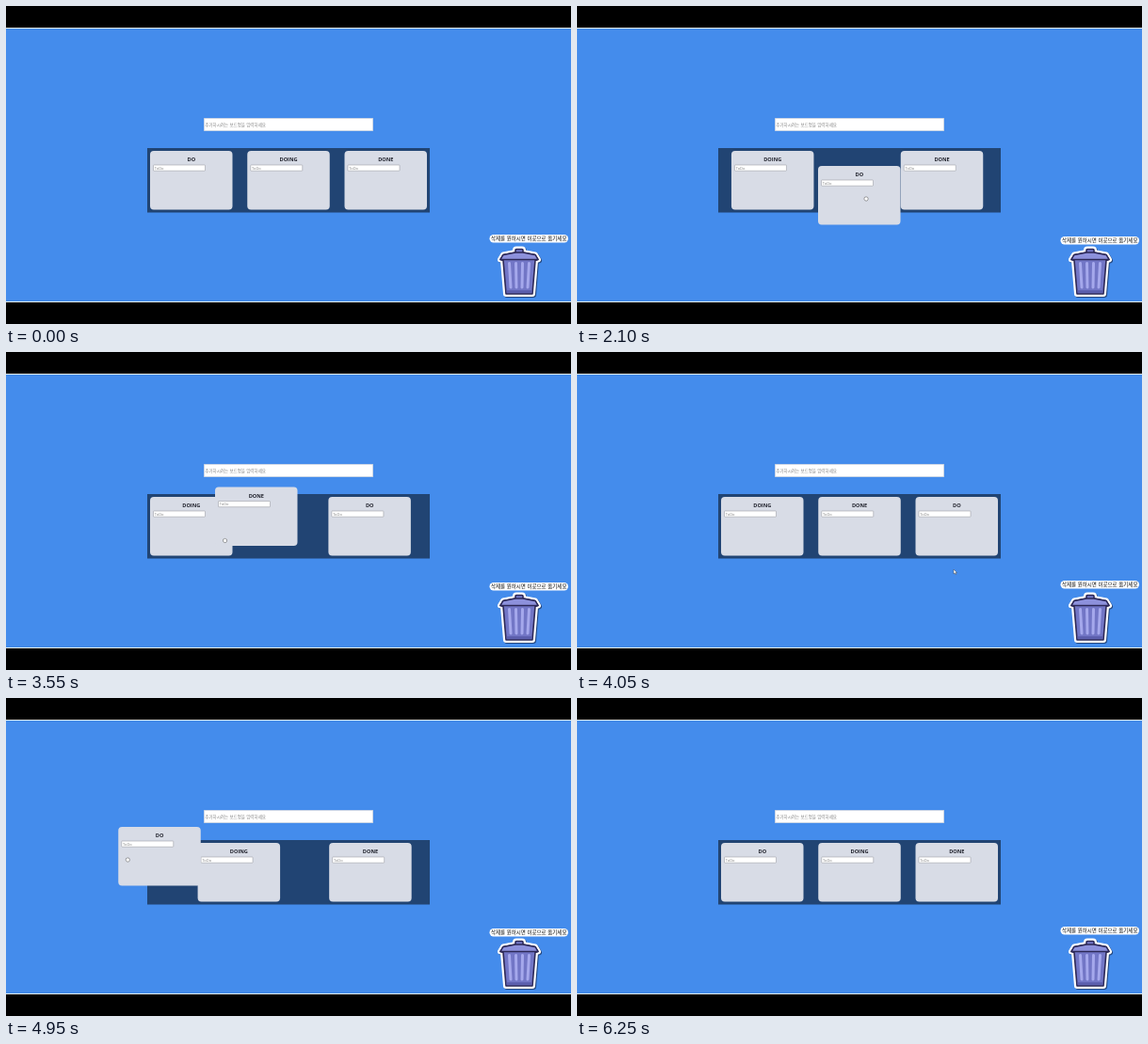
An HTML page for the animation above (6550 ms loop, 600 by 338 pixels).

```html
<!DOCTYPE html>
<html lang="ko">
<head>
<meta charset="utf-8">
<style>
  html, body { margin: 0; width: 100%; height: 100%; overflow: hidden; background: #000; }
  svg { display: block; width: 100vw; height: 100vh; }
  text { font-family: "Noto Sans CJK KR", "Noto Sans", sans-serif; }
  .title { font: bold 5.6px "Open Sans", "Noto Sans", sans-serif; fill: #20222c; text-anchor: middle; }
  .hint { font: 4px "Open Sans", "Noto Sans", sans-serif; fill: #858585; }
</style>
</head>
<body>
<svg viewBox="0 0 600 338">
  <defs>
    <path id="can" d="M541 262V259.500Q541 258.500 542 258.500H548Q549 258.500 549 259.500V262L562 264.500L565 269.500L562 270.500L559 306H531L528 270.500L525 269.500L528 264.500Z" stroke-linejoin="round"/>
  </defs>
  <rect width="600" height="338" fill="#000"/>
  <rect y="23" width="600" height="292" fill="#e6effa"/>
  <rect y="24" width="600" height="290" fill="#448cec"/>

  <rect x="210.250" y="119.250" width="179.500" height="13.500" fill="#fff" stroke="#c5cad3" stroke-width=".5"/>
  <text x="211.300" y="127.600" font-size="4.500" fill="#858585">추가하시려는 보드명을 입력하세요</text>
  <rect x="150" y="151" width="300" height="68.500" fill="#214473"/>

  <use href="#can" x="1" y="1" fill="#24477f" stroke="#24477f" stroke-width="6"/>
  <use href="#can" fill="#fff" stroke="#fff" stroke-width="6"/>
  <use href="#can" fill="#7276c6" stroke="#2c2857" stroke-width="1.600"/>
  <path d="M528 264.500L541 262H549L562 264.500L565 269.500H525Z" fill="#8d91dc" stroke="#2c2857" stroke-width="1.400" stroke-linejoin="round"/>
  <path d="M534.500 273.500L536 299M541.500 273.500L542 299M548.500 273.500L548 299M555.500 273.500L554 299" stroke="#a5a8ec" stroke-width="3" stroke-linecap="round"/>
  <path d="M531.500 303.500H558.500" stroke="#5a5dab" stroke-width="2.500"/>

  <g id="label">
    <rect x="513.500" y="243" width="83.500" height="8.500" rx="4.200" fill="#fff"/>
    <text x="555.200" y="249.200" font-size="5.500" font-weight="500" text-anchor="middle" fill="#111">삭제를 원하시면 이곳으로 옮기세요</text>
  </g>

  <g id="cards"></g>
  <path id="arrow" d="M0 0V4.800L1.200 3.800L2 5.500L2.800 5.100L2.100 3.500H3.500Z" fill="#fff" stroke="#333" stroke-width=".4"/>
  <g id="hand">
    <path d="M-1.900 -.6Q-1.900 -2 -.9 -1.800Q0 -2.500 .8 -1.900Q2 -1.900 2 -.6V.6Q1.700 2.100 .2 2.100Q-1.500 2.100 -1.900 .6Z" fill="#fff" stroke="#444" stroke-width=".5"/>
  </g>
</svg>
<script>
const LOOP = 6550, STEP = 50, DROP_MS = 400, SHIFT_MS = 200;
const LEFT = 153, TOP = 154, WIDTH = 87.5, PITCH = 103.25;
const $ = id => document.getElementById(id);

// Cursor path: time, x, y
const path = [
  [750, 330, 126], [1350, 204, 189], [1500, 204, 189], [1900, 240, 196], [2100, 307, 205],
  [2250, 300, 188], [2950, 370, 211], [3050, 370, 211], [3500, 235, 211], [3600, 230, 190],
  [4050, 401, 233], [4300, 369.5, 189], [4350, 369.5, 189], [4700, 253, 255], [4850, 150, 215],
  [5000, 122, 157], [5050, 122, 157], [5300, 185, 197], [5550, 215, 228]
];
const handTimes = [[1300, 2250], [2700, 3600], [4250, 5050]];

// Each drag lists the times at which the card takes an index
const drags = [
  { name: 'DO', drop: 2250, stops: [[1500, 0], [2000, 1]] },
  { name: 'DONE', drop: 3600, stops: [[3050, 2], [3400, 1]] },
  { name: 'DO', drop: 5050, stops: [[4350, 2], [4800, 1], [4900, 0]] }
];

const cards = {};
for (const name of ['DO', 'DOING', 'DONE']) {
  const g = document.createElementNS('http://www.w3.org/2000/svg', 'g');
  g.innerHTML = `<rect width="87.5" height="62.500" rx="4" fill="#d8dce6"/>
    <text class="title" x="43.800" y="11.200">${name}</text>
    <rect x="3.500" y="15" width="55" height="6.200" rx=".6" fill="#fff" stroke="#8c8f96" stroke-width=".5"/>
    <text class="hint" x="4.800" y="19.500">ToDo</text>`;
  $('cards').append(g);
  cards[name] = g;
}

const clamp = v => Math.max(0, Math.min(1, v));
const easeOut = p => 1 - (1 - clamp(p)) ** 3;
const mix = (a, b, p) => a + (b - a) * p;
const move = (el, x, y) => el.setAttribute('transform', `translate(${x} ${y})`);
const show = (el, on) => el.setAttribute('visibility', on ? 'visible' : 'hidden');

function cursorAt(t) {
  const i = path.findIndex(p => p[0] >= t);
  if (i < 1) return path[i ? path.length - 1 : 0].slice(1);
  const [a, b] = [path[i - 1], path[i]];
  const p = (t - a[0]) / (b[0] - a[0]), s = p * p * (3 - 2 * p);
  return [mix(a[1], b[1], s), mix(a[2], b[2], s)];
}

// Siblings at or after the hovered index make room for the card
function shiftOf(j, stops, t) {
  let x = 0;
  stops.forEach(([start, index], k) => {
    if (t >= start) x = mix(x, j >= index ? WIDTH : 0, k ? easeOut((t - start) / SHIFT_MS) : 1);
  });
  return x;
}

function draggedAt({ stops, drop }, t) {
  const [lift, from] = stops[0], to = stops[stops.length - 1][1];
  const grab = cursorAt(lift), now = cursorAt(Math.min(t, drop));
  const p = easeOut((t - drop) / DROP_MS);
  return [
    mix(LEFT + from * PITCH + now[0] - grab[0], LEFT + to * WIDTH, p),
    mix(TOP + now[1] - grab[1], TOP, p)
  ];
}

function draw(t) {
  let order = ['DO', 'DOING', 'DONE'], active;
  for (const d of drags) {
    if (t < d.stops[0][0]) break;
    const rest = order.filter(n => n !== d.name);
    if (t < d.drop + DROP_MS) {
      active = d;
      order = rest;
    } else {
      rest.splice(d.stops[d.stops.length - 1][1], 0, d.name);
      order = rest;
    }
  }
  order.forEach((name, j) =>
    move(cards[name], LEFT + j * PITCH + (active ? shiftOf(j, active.stops, t) : 0), TOP));
  if (active) {
    const card = cards[active.name];
    if ($('cards').lastChild !== card) $('cards').append(card);
    move(card, ...draggedAt(active, t));
  }
  move($('label'), 0, active ? 2 : 0);

  const visible = t >= 750 && t < 5550;
  const isHand = handTimes.some(([a, b]) => t >= a && t < b);
  const [x, y] = cursorAt(t);
  show($('hand'), visible && isHand);
  show($('arrow'), visible && !isHand);
  move($('hand'), x, y);
  move($('arrow'), x - 1, y - 2);
}

const began = performance.now();
function tick() {
  const t = (performance.now() - began) % LOOP;
  draw(Math.floor(t / STEP) * STEP);
  requestAnimationFrame(tick);
}
tick();
</script>
</body>
</html>
```
